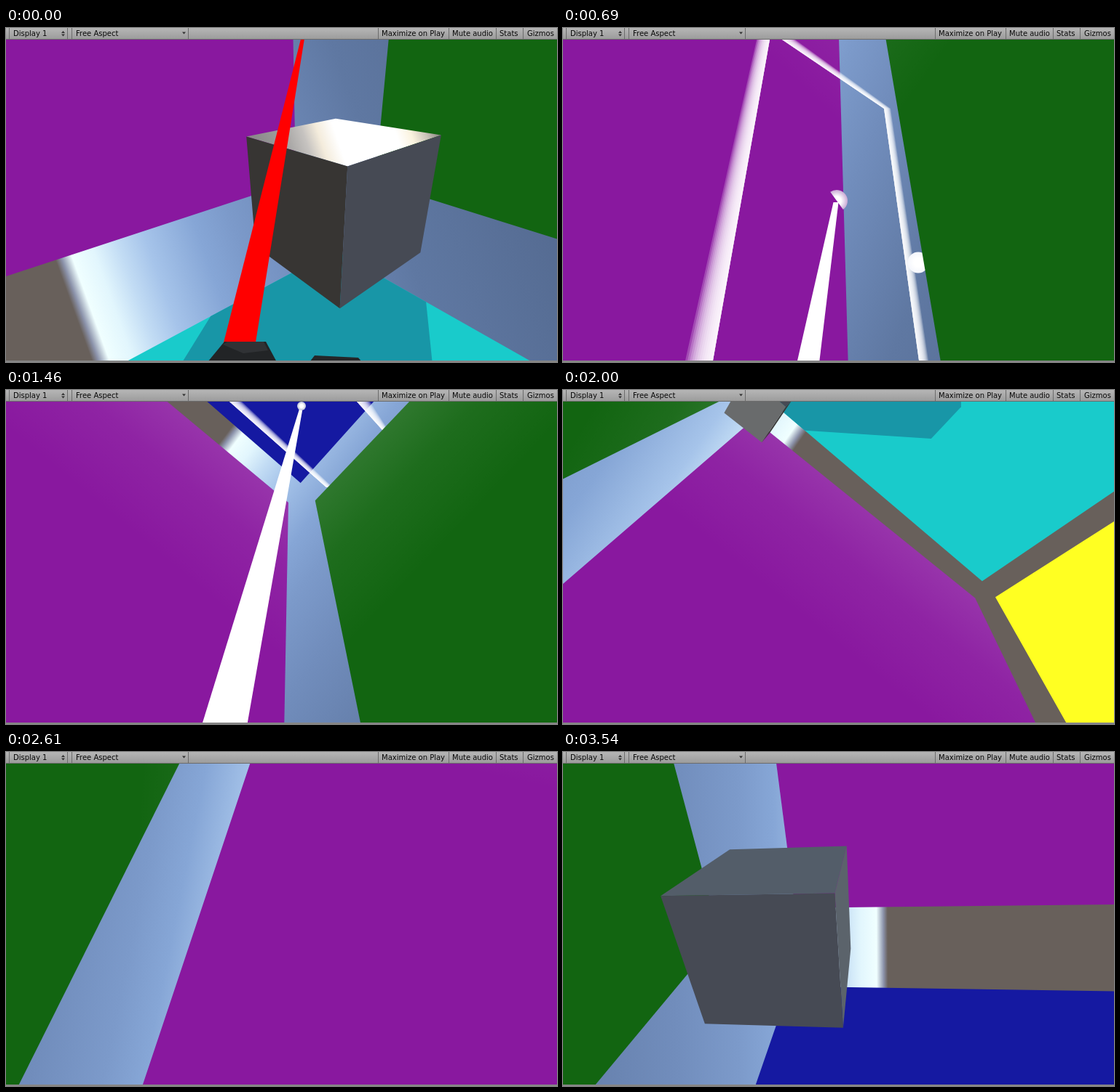
These frames come from a looping animation (757 px wide and 460 px high, 3610 ms). An HTML page with a canvas:

```html
<!DOCTYPE html>
<html>
<head>
<meta charset="utf-8">
<style>
html, body { margin: 0; width: 100%; height: 100%; overflow: hidden; background: #a5a5a5; }
canvas { display: block; }
</style>
</head>
<body>
<canvas id="stage" width="757" height="460"></canvas>
<script>
const ctx = document.getElementById('stage').getContext('2d');
const LOOP = 3610, STEP = 76.8, LAST = 46;
const CX = 378, CY = 237, FOCAL = 430, NEAR = .02;
const AIM = 5, CEILING_AIM = 14, JUMP = 21;

// A room of floating square panels (half size 1) at distance D from its centre.
const D = 1.108;
const PANELS = [
  { axis: 1, at: D, color: '#1519a1' },
  { axis: 1, at: -D, color: '#19cbcb' },
  { axis: 0, at: -D, color: '#ffff22' },
  { axis: 2, at: -D, color: '#89189f' },
  { axis: 0, at: D, color: '#126511' }
];
const SHADOW = [[1, -1], [.745, -1], [.144, -.55], [.15, -.33], [.19, -.3], [1, -.82]];

// step, eye x y z, yaw, pitch, roll
const CAMERA = [
  [0, .625, -.776, -.666, 37.3, -24.5, -2.3],
  [9, .615, -.74, -.655, 39.2, 32.4, -1],
  [19, .611, -.722, -.645, 37.8, 59.8, 3],
  [JUMP, .611, -.722, -.645, 37.8, 59.8, 3],
  [26, .841, .843, -.495, -37.8, -54.2, 182.7],
  [30, .856, .71, -.554, -11.4, -49.6, 195.4],
  [39, .846, .782, -.568, 11.7, 0, 184.9],
  [LAST, .853, .743, -.559, 6.6, 28, 176.6]
];
// step, tip x y, tip width, base left, base right
const LASER = [
  [0, 416, -26, 1, 277, 329],
  [9, 375, 240, 7, 308, 345],
  [19, 406, 23, 4, 251, 321]
];
// sine of elevation, colour
const SKY = [
  [-1, '#68605b'], [-.055, '#68605b'], [-.042, '#8b92aa'], [-.02, '#f0ffff'], [.03, '#e2f6fd'],
  [.09, '#c2dcf4'], [.16, '#a6c4ea'], [.3, '#86a6d6'], [.4, '#7c9aca'], [.55, '#718dbc'],
  [.78, '#5f78a2'], [1, '#46587a']
];

const dot = (a, b) => a[0] * b[0] + a[1] * b[1] + a[2] * b[2];
const mix = (a, b, u) => a.map((v, i) => v + (b[i] - v) * u);

function track(keys, step) {
  let i = 0;
  while (i < keys.length - 2 && step >= keys[i + 1][0]) i++;
  const a = keys[i], b = keys[i + 1];
  return mix(a, b, Math.min(1, (step - a[0]) / (b[0] - a[0]))).slice(1);
}

let cam;
function aimCamera(step) {
  const [x, y, z, ...angles] = track(CAMERA, step);
  const [yaw, pitch, roll] = angles.map(a => a * Math.PI / 180);
  const sy = Math.sin(yaw), cy = Math.cos(yaw), sp = Math.sin(pitch), cp = Math.cos(pitch);
  const sr = Math.sin(roll), cr = Math.cos(roll);
  const side = [cy, 0, sy], over = [-sp * sy, cp, sp * cy];
  cam = {
    eye: [x, y, z], pitch: angles[1],
    right: side.map((v, i) => v * cr + over[i] * sr),
    down: side.map((v, i) => v * sr - over[i] * cr),
    forward: [cp * sy, sp, -cp * cy]
  };
}

function toCamera(p) {
  const d = p.map((v, i) => v - cam.eye[i]);
  return [dot(d, cam.right), dot(d, cam.down), dot(d, cam.forward)];
}

const toScreen = ([x, y, z]) => [CX + x / z * FOCAL, CY + y / z * FOCAL];

// Projects a world polygon, cut at the near plane.
function project(points) {
  const out = [], pts = points.map(toCamera);
  pts.forEach((a, i) => {
    const b = pts[(i + 1) % pts.length];
    if (a[2] >= NEAR) out.push(toScreen(a));
    if (a[2] >= NEAR !== b[2] >= NEAR) out.push(toScreen(mix(a, b, (NEAR - a[2]) / (b[2] - a[2]))));
  });
  return out;
}

// One side of the box lo..hi: the square where `axis` equals `at`.
function square(axis, at, lo, hi) {
  const j = (axis + 1) % 3, k = (axis + 2) % 3;
  return [[lo, lo], [hi, lo], [hi, hi], [lo, hi]].map(([a, b]) => {
    const p = [];
    p[axis] = at;
    p[j] = a[j];
    p[k] = b[k];
    return p;
  });
}

function poly(points, fill) {
  ctx.beginPath();
  points.forEach(p => ctx.lineTo(...p));
  ctx.closePath();
  ctx.fillStyle = fill;
  ctx.fill();
}

function linear(x0, y0, x1, y1, stops) {
  const g = ctx.createLinearGradient(x0, y0, x1, y1);
  stops.forEach(([at, color]) => g.addColorStop(at, color));
  return g;
}

// The sky's zenith is the +x direction of the room.
function drawSky() {
  const gx = cam.right[0], gy = cam.down[0], len = Math.hypot(gx, gy);
  const tilt = Math.asin(cam.forward[0]), reach = 1600;
  const dx = gx / len * reach, dy = gy / len * reach;
  const stops = SKY.map(([sine, color]) => {
    const angle = Math.max(-1.3, Math.min(1.3, Math.asin(sine) - tilt));
    return [.5 + FOCAL * Math.tan(angle) / reach / 2, color];
  });
  ctx.fillStyle = linear(CX - dx, CY - dy, CX + dx, CY + dy, stops);
  ctx.fillRect(0, 0, 757, 460);
}

// Panels grow paler towards the edge farthest from the eye.
function drawGlow(shape, axis) {
  const far = cam.eye[1] < 0 ? 1 : -1;
  const corner = axis ? [1, far, -D] : [D, far, -1];
  const along = axis ? [.7, far, -D] : [D, far, -.7];
  const inner = [corner[0], far * .7, corner[2]];
  const pts = [corner, along, inner].map(toCamera);
  if (pts.some(p => p[2] < .05)) return;
  const [[x, y], [ax, ay], [ix, iy]] = pts.map(toScreen);
  const dx = ax - x, dy = ay - y;
  const k = Math.sign(dx * (iy - y) - dy * (ix - x)) * 170 / Math.hypot(dx, dy);
  poly(shape, linear(x, y, x - dy * k, y + dx * k,
    [[0, 'rgba(255,255,255,.12)'], [.4, 'rgba(255,255,255,.05)'], [1, 'rgba(255,255,255,0)']]));
}

// Soft strip: white along the line, clear at the sideways offsets w0 and w1.
function band(x0, y0, x1, y1, w0, w1) {
  for (let u = 1; u > 0; u -= 1 / 12) {
    poly([[x0, y0], [x1, y1], [x1 + w1 * u, y1], [x0 + w0 * u, y0]], 'rgba(255,255,255,.22)');
  }
}

function ball(x, y, r, from, to, rim) {
  const g = ctx.createRadialGradient(x, y, r * .4, x, y, r);
  g.addColorStop(0, '#fff');
  g.addColorStop(1, rim);
  ctx.beginPath();
  ctx.arc(x, y, r, from, to);
  ctx.fillStyle = g;
  ctx.fill();
}

function drawOutline(step) {
  if (step < AIM || step > JUMP) return;
  if (step < CEILING_AIM) {
    band(284, 16, 206, 458, -18, -38);
    band(301, 16, 441, 111, 18, 9);
    band(441, 111, 489, 458, 9, 13);
    ball(488, 323, 14.5, 0, 7, '#f4f6fc');
  } else {
    band(307, 16, 440, 134, 17, 9);
    band(482, 16, 517, 55, 18, 8);
  }
}

// The cube rests in the floor corner, then falls up to the ceiling.
function drawCube(step) {
  const fall = Math.min(1.985, (.075 * Math.max(0, step - JUMP - .7)) ** 2);
  const lo = [.893, fall - 1.105, -1.105], hi = [1.106, fall - .892, -.89];
  const side = mix([55, 53, 51], [91, 99, 107], fall / 1.985);
  const face = (axis, at) => project(square(axis, at, lo, hi));
  if (cam.eye[1] < lo[1]) poly(face(1, lo[1]), '#535d69');
  if (cam.eye[1] > hi[1]) {
    const [x, y] = toScreen(toCamera([lo[0], hi[1], lo[2]]));
    poly(face(1, hi[1]), step > JUMP ? '#696b6c' : linear(x, y, x + 265, y - 90, [
      [0, '#858585'], [.15, '#9c9b9b'], [.27, '#c6c3c0'], [.34, '#f4ecdc'], [.42, '#fff'],
      [.7, '#fff'], [.77, '#fbf3df'], [.84, '#c9c2b8'], [.9, '#8b8883']]));
  }
  if (cam.eye[0] < lo[0]) poly(face(0, lo[0]), `rgb(${side})`);
  if (cam.eye[2] > hi[2]) poly(face(2, hi[2]), '#464a54');
}

function drawLaser(step) {
  if (step > JUMP) return;
  const [x, y, w, left, right] = track(LASER, step);
  poly([[x - w / 2, y], [x + w / 2, y], [right, 520], [left, 520]], step < AIM ? '#f00' : '#fff');
  if (step >= CEILING_AIM) ball(x, y - 1, 6, 0, 7, '#b9c0d8');
  else if (step >= AIM) ball(x + 1, y - 2, 15, -2.2, .94, '#c9a9d4');

  // Hand controllers sink out of view as the head tilts up.
  ctx.save();
  ctx.translate(0, (cam.pitch - CAMERA[0][5]) * 1.6);
  poly([[277, 460], [300, 432], [357, 432], [372, 460]], '#222426');
  poly([[298, 436], [304, 432], [354, 432], [360, 444], [326, 448]], '#303235');
  poly([[417, 460], [424, 451], [484, 454], [489, 460]], '#242628');
  ctx.restore();
}

function drawRoom(step) {
  aimCamera(step);
  ctx.save();
  ctx.beginPath();
  ctx.rect(0, 15, 757, 443);
  ctx.clip();
  drawSky();
  for (const { axis, at, color } of PANELS) {
    // The outline lies behind the right-hand wall.
    if (axis === 0 && at > 0) drawOutline(step);
    const shape = project(square(axis, at, [-1, -1, -1], [1, 1, 1]));
    poly(shape, color);
    if (axis === 1 && at < 0) poly(project(SHADOW.map(([x, z]) => [x, -D, z])), '#1896a7');
    if (axis === 2 || axis === 0 && at > 0) drawGlow(shape, axis);
  }
  drawCube(step);
  drawLaser(step);
  ctx.restore();
}

function drawToolbar() {
  ctx.fillStyle = linear(0, 0, 0, 15, [[0, '#b6b6b6'], [1, '#9c9c9c']]);
  ctx.fillRect(0, 0, 757, 15);
  ctx.fillStyle = '#6c6c6c';
  ctx.fillRect(0, 15, 757, 1);
  for (const x of [4, 84, 90, 250, 511, 608, 673, 710]) ctx.fillRect(x, 0, 1, 15);
  ctx.fillStyle = '#858585';
  ctx.fillRect(0, 458, 757, 2);
  ctx.font = '10px "DejaVu Sans", sans-serif';
  ctx.fillStyle = '#080808';
  [['Display 1', 10], ['Free Aspect', 96], ['Maximize on Play', 516], ['Mute audio', 613],
    ['Stats', 678], ['Gizmos', 716]].forEach(([label, x]) => ctx.fillText(label, x, 11));
  const arrow = (x, y, h) => poly([[x - 2.5, y], [x + 2.5, y], [x, y + h]], '#333');
  arrow(78.5, 7, -3);
  arrow(78.5, 8.5, 3);
  arrow(244.5, 5.5, 3);
}

function frame() {
  const time = performance.now() % LOOP;
  drawRoom(Math.min(LAST, Math.floor((time + 5) / STEP)));
  drawToolbar();
  requestAnimationFrame(frame);
}
frame();
</script>
</body>
</html>
```
